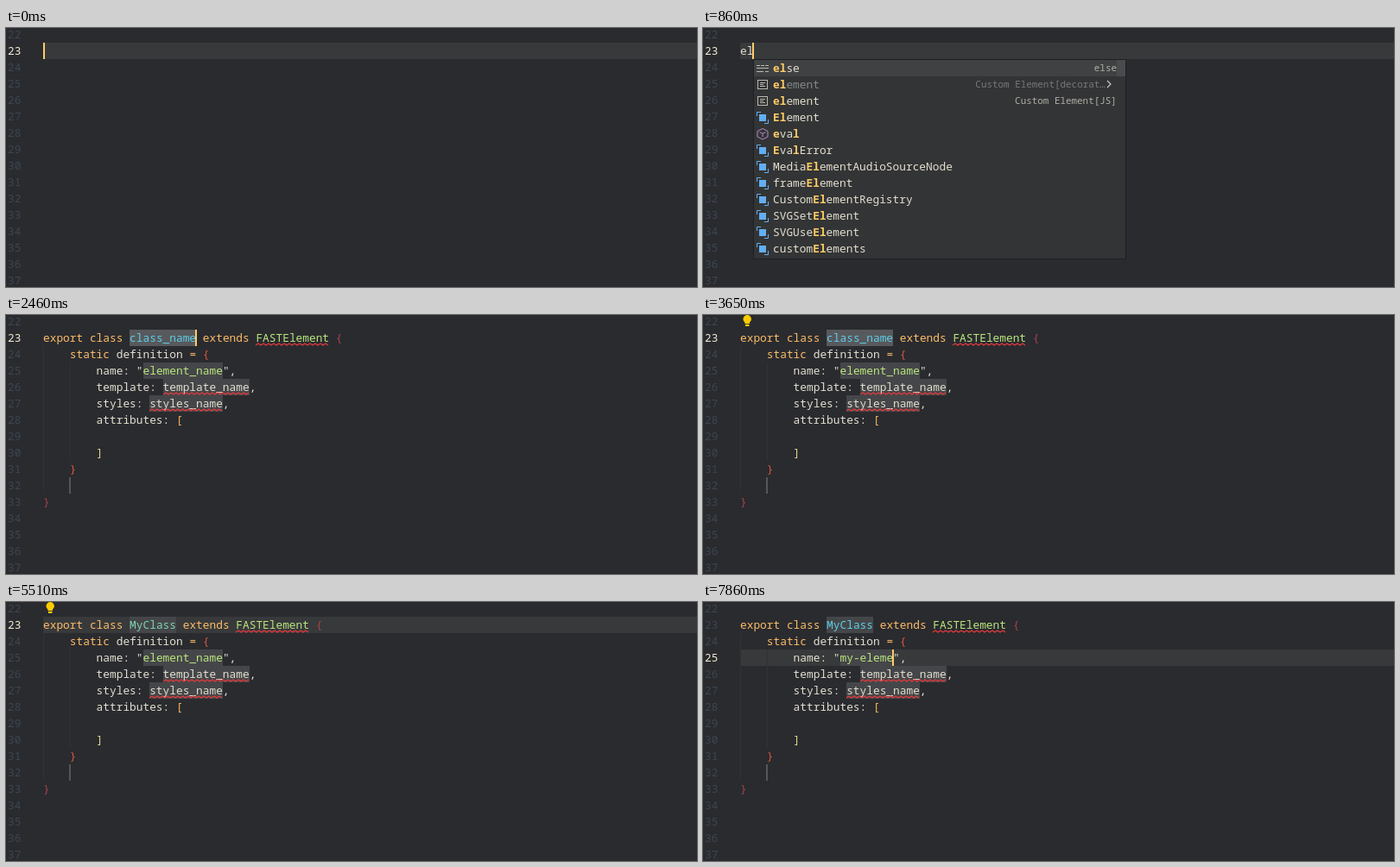
These frames come from a looping animation (800x300 px, 7990 ms). An HTML page with a canvas:

```html
<!DOCTYPE html>
<html lang="en">
<head>
<meta charset="utf-8">
<title>Snippet completion</title>
<style>
html, body { margin: 0; width: 100%; height: 100%; overflow: hidden; background: #2a2b2f; }
canvas { display: block; }
</style>
</head>
<body>
<canvas id="stage" width="800" height="300"></canvas>
<script>
(() => {
const ctx = document.getElementById('stage').getContext('2d');
const LOOP = 7990, LEFT = 43, CHAR = 7.7, LINE = 19;
const FAMILY = '"Noto Sans Mono", "DejaVu Sans Mono", monospace';
const SIZE = CHAR / 0.6, SMALL = 6.55 / 0.6;

const C = {
  bg: '#2a2b2f', line: '#38393b', num: '#3b4651', active: '#f0e8cf',
  text: '#e3dfd0', keyword: '#fdbd68', cursor: '#ffcc66', type: '#5ccfe6',
  fresh: '#7fd3b0', green: '#bae67e', outer: '#a8434c', inner: '#d9583f',
  bracket: '#f7b45c', field: '#454649', selected: '#58595d', error: '#e5393c',
  menu: '#333435', menuSel: '#404142', menuEdge: '#1d1f22', match: '#ffcc66',
  detail: '#b0afa8', dim: '#85898a', blue: '#62aef2', purple: '#b48ac9'
};

// Cursor-off spans and keystroke times
const OFF = [[190, 650], [1460, 1920], [2660, 3190], [3650, 4050], [5380, 5860], [6330, 6730]];
const QUERY_KEYS = [720, 790, 990];
const CLASS_KEYS = [4050, 4180, 4510, 4710, 4780, 4910, 4980];
const NAME_KEYS = [6730, 6800, 7000, 7400, 7530, 7600, 7730, 7860];

const FIRST_MENU = [
  ['k', '*el*se', 'else'],
  ['s', '*el*ement', 'Custom Element[decorat…>', true],
  ['s', '*el*ement', 'Custom Element[JS]'],
  ['v', '*El*ement'],
  ['c', '*e*va*l*'],
  ['v', '*E*va*l*Error'],
  ['v', 'Media*El*ementAudioSourceNode'],
  ['v', 'frame*El*ement'],
  ['v', 'Custom*El*ementRegistry'],
  ['v', 'SVGSet*El*ement'],
  ['v', 'SVGUse*El*ement'],
  ['v', 'custom*El*ements']
];
const nextMenu = (first, second) => [
  ['s', '*ele*ment', first],
  ['s', '*ele*ment', second],
  ['v', '*Ele*ment'],
  ['k', '*el*s*e*'],
  ['v', '*E*va*lE*rror'],
  ['v', 'Media*Ele*mentAudioSourceNode'],
  ['v', 'frame*Ele*ment'],
  ['v', 'Custom*Ele*mentRegistry'],
  ['v', 'SVGSet*Ele*ment'],
  ['v', 'SVGUse*Ele*ment'],
  ['v', 'custom*Ele*ments'],
  ['v', 'HTMLDiv*Ele*ment']
];

const lineY = n => (n - 22) * LINE - 2;
const colX = c => LEFT + c * CHAR;
const typed = (word, keys, t) => word.slice(0, keys.filter(k => k <= t).length);

function rect(x, y, w, h, color) {
  ctx.fillStyle = color;
  ctx.fillRect(x, y, w, h);
}

function write(x, y, str, color, size = SIZE, weight = 400) {
  ctx.font = `${weight} ${size}px ${FAMILY}`;
  ctx.fillStyle = color;
  ctx.fillText(str, x, y);
}

function stroke(points, color, width = 1) {
  ctx.beginPath();
  points.forEach(([x, y], i) => i ? ctx.lineTo(x, y) : ctx.moveTo(x, y));
  ctx.strokeStyle = color;
  ctx.lineWidth = width;
  ctx.stroke();
}

// Writes [text, color] runs on a line, starting at a column
function code(n, col, ...runs) {
  for (const [str, color] of runs) {
    write(colX(col), lineY(n) + 14, str, color);
    col += str.length;
  }
}

function field(n, col, len, selected) {
  const x = Math.round(colX(col));
  rect(x, lineY(n), Math.round(colX(col + len)) - x, LINE, selected ? C.selected : C.field);
}

function squiggle(n, col, len) {
  const x0 = Math.round(colX(col)), x1 = Math.round(colX(col + len)), y = lineY(n) + 18;
  const points = [];
  for (let x = x0; x <= x1; x += 3) points.push([x, y - ((x - x0) / 3 % 2) * 2]);
  stroke(points, C.error, 1.15);
}

function cursor(n, col) {
  rect(Math.max(LEFT, Math.round(colX(col)) - 1), lineY(n), 2, LINE, C.cursor);
}

function bulb(y) {
  ctx.fillStyle = '#ffcc00';
  ctx.beginPath();
  ctx.arc(51.2, y + 4.7, 4.7, 0, 7);
  ctx.fill();
  rect(48.5, y + 7, 5.4, 3.2, '#ffcc00');
  rect(49, y + 11, 4.4, 2, '#ffcc00');
}

const ICONS = {
  k(x, y) {
    const c = '#b9b8b0';
    for (const dx of [0, 5, 10]) rect(x + dx, y + 3, 4, 1, c);
    rect(x, y + 6, 14, 1, c);
    rect(x, y + 10, 8, 1, c);
    rect(x + 10, y + 10, 4, 1, c);
  },
  s(x, y) {
    const c = '#b9b8b0';
    ctx.strokeStyle = c;
    ctx.lineWidth = 1;
    ctx.strokeRect(x + 1.5, y + 1.5, 11, 10);
    rect(x + 4, y + 4, 6, 1, c);
    rect(x + 4, y + 6, 4, 1, c);
    rect(x + 4, y + 8, 6, 1, c);
  },
  v(x, y) {
    rect(x + 3, y + 3, 8, 8, C.blue);
    stroke([[x + 0.5, y + 5], [x + 0.5, y + 0.5], [x + 5, y + 0.5]], C.blue);
    stroke([[x + 9, y + 13.5], [x + 13.5, y + 13.5], [x + 13.5, y + 9]], C.blue);
  },
  c(x, y) {
    stroke([[x + 7, y + 0.5], [x + 13, y + 3.5], [x + 13, y + 10], [x + 7, y + 13],
      [x + 1, y + 10], [x + 1, y + 3.5], [x + 7, y + 0.5]], C.purple);
    stroke([[x + 3.5, y + 4.7], [x + 7, y + 6.3], [x + 10.5, y + 4.7]], C.purple);
    stroke([[x + 7, y + 6.3], [x + 7, y + 10]], C.purple);
  }
};

function menu(x, rows, selected) {
  rect(x, 36, 432, 232, C.menuEdge);
  rect(x + 1, 37, 430, 230, C.menu);
  rect(x + 1, 37 + selected * LINE, 430, LINE, C.menuSel);
  rect(x + 421, 37, 10, LINE, '#4a4b4d');
  rows.forEach(([icon, label, detail, dim], i) => {
    const y = 37 + i * LINE;
    ICONS[icon](x + 4, y + 3);
    let tx = x + 23;
    label.split('*').forEach((part, k) => {
      const hit = k % 2;
      write(tx, y + 14, part, hit ? C.match : dim ? C.dim : C.text, SIZE, hit ? 700 : 400);
      tx += part.length * CHAR;
    });
    if (!detail) return;
    const more = detail.endsWith('>');
    const str = more ? detail.slice(0, -1) : detail;
    const right = x + (more ? 408 : 421);
    write(right - str.length * 6.55, y + 13, str, dim ? '#77797a' : C.detail, SMALL);
    if (more) stroke([[x + 410, y + 5], [x + 414, y + 9], [x + 410, y + 13]], '#c8c7c0', 1.2);
  });
}

function lineNumbers(active) {
  for (let n = 22; n <= 37; n++) {
    write(2, lineY(n) + 14, String(n), n === active ? C.active : C.num);
  }
}

function highlight(n) {
  rect(LEFT, lineY(n), 800 - LEFT, LINE, C.line);
}

function drawQuery(t, blink) {
  const word = typed('ele', QUERY_KEYS, t);
  lineNumbers(23);
  highlight(23);
  code(23, 0, [word, C.text]);
  if (t >= 1390) squiggle(23, 0, 3);
  if (t >= 1660) menu(66, nextMenu('Custom Element[decorated]', 'Custom Element[…>'), 1);
  else if (t >= 990) menu(66, nextMenu('Custom Element[decorat…>', 'Custom Element[JS]'), 0);
  else if (t >= 860) menu(58, FIRST_MENU, 0);
  if (blink) cursor(23, word.length);
}

function drawSnippet(t, blink) {
  const naming = t >= 5860;
  const pickClass = t < 4050, pickName = naming && t < 6730;
  const cls = pickClass ? 'class_name' : typed('MyClass', CLASS_KEYS, t);
  const name = t < 6730 ? 'element_name' : typed('my-element', NAME_KEYS, t);
  const active = naming ? 25 : 23;
  const base = 13 + cls.length + 9;

  lineNumbers(active);
  if (!pickClass && !pickName) highlight(active);
  rect(LEFT, lineY(24), 1, LINE * 9, '#303236');
  rect(74, lineY(25), 1, LINE * 6, '#303236');

  field(23, 13, cls.length, pickClass);
  field(25, 15, name.length, pickName);
  field(26, 18, 13);
  field(27, 16, 11);
  rect(73, lineY(32), 2, LINE, '#55565a');

  code(23, 0, ['export class ', C.keyword], [cls, pickClass || naming ? C.type : C.fresh],
    [' extends ', C.keyword], ['FASTElement', C.green], [' {', C.outer]);
  code(24, 4, ['static', C.keyword], [' definition ', C.text], ['= ', C.keyword], ['{', C.inner]);
  code(25, 8, ['name: "', C.text], [name, C.green], ['",', C.text]);
  code(26, 8, ['template: template_name,', C.text]);
  code(27, 8, ['styles: styles_name,', C.text]);
  code(28, 8, ['attributes: ', C.text], ['[', C.bracket]);
  code(30, 8, [']', '#e6d48e']);
  code(31, 4, ['}', C.inner]);
  code(33, 0, ['}', C.outer]);

  if (t >= 2460) {
    // The error mark trails the typing until the next check
    const lag = t >= 4710 && t < 5510 ? 1 : 0;
    squiggle(23, base - lag, 11 + lag);
    squiggle(26, 18, 13);
    squiggle(27, 16, 11);
  }
  if (t >= 2590 && t < 6130) bulb(0);
  if ((t >= 6130 && t < 6730) || (t >= 7270 && t < 7400)) bulb(57);
  if (blink) naming ? cursor(25, 15 + name.length) : cursor(23, 13 + cls.length);
}

function draw(t) {
  const blink = !OFF.some(([a, b]) => t >= a && t < b);
  rect(0, 0, 800, 300, C.bg);
  (t < 2190 ? drawQuery : drawSnippet)(t, blink);
}

let start;
function tick(now) {
  start ??= now;
  draw((now - start) % LOOP);
  requestAnimationFrame(tick);
}
requestAnimationFrame(tick);
})();
</script>
</body>
</html>
```
